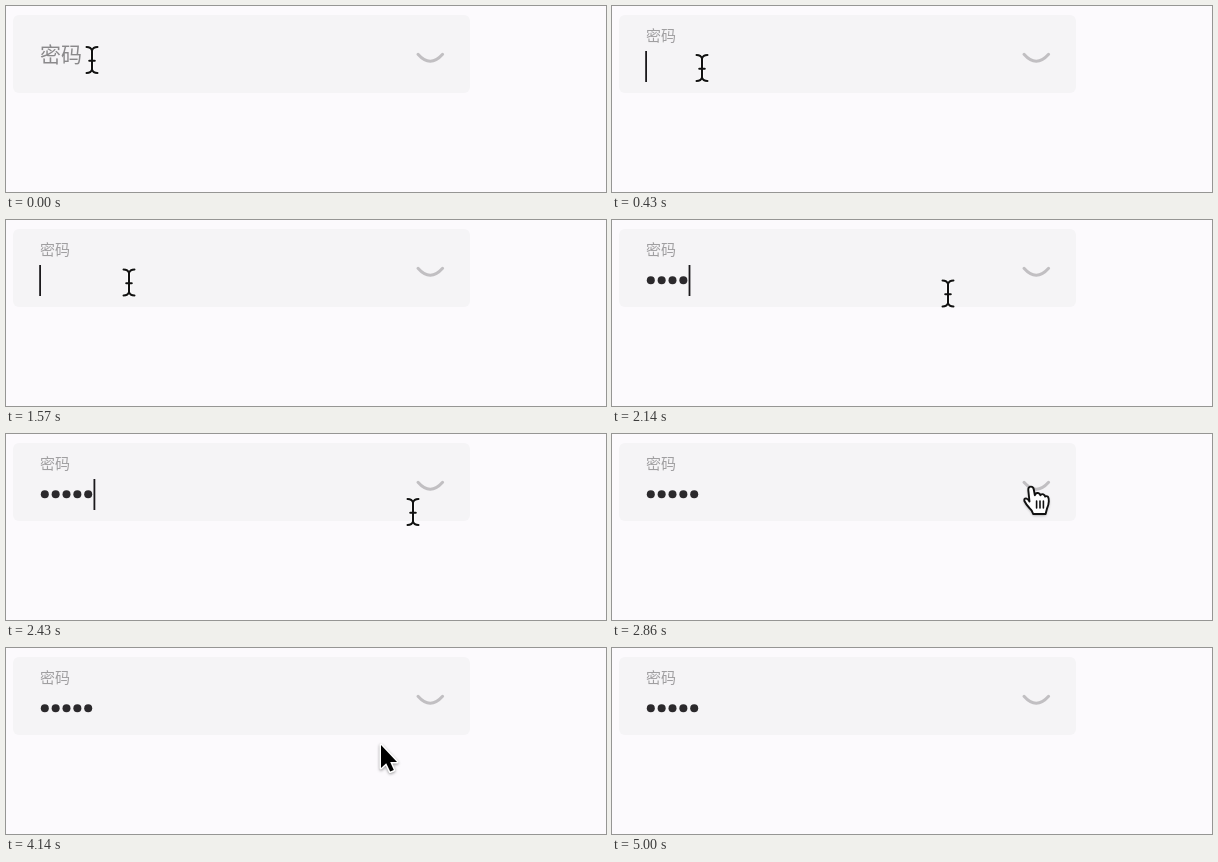
These frames come from a looping animation (600x186 px, 6010 ms). An HTML page with a canvas:

```html
<!DOCTYPE html>
<html lang="zh">
<head>
<meta charset="utf-8">
<title>密码</title>
<style>
html, body { margin: 0; width: 100%; height: 100%; overflow: hidden; background: #fcfafd; }
canvas { display: block; }
</style>
</head>
<body>
<canvas id="stage" width="600" height="186"></canvas>
<script>
const ctx = document.getElementById('stage').getContext('2d');
const LOOP = 6010;
const CJK = '"Noto Sans CJK SC", "Noto Sans CJK", sans-serif';

// [start ms, pointer kind, x, y]
const pointer = [
  [0, 'beam', 86, 54],
  [430, 'beam', 90, 62],
  [570, 'arrow', 107, 96],
  [710, 'arrow', 120, 117],
  [860, 'arrow', 124, 113],
  [1000, 'arrow', 126, 101],
  [1140, 'beam', 126, 67],
  [1290, 'beam', 123, 62.5],
  [1710, 'beam', 152, 64],
  [1860, 'beam', 209, 67],
  [2000, 'beam', 275, 70],
  [2140, 'beam', 336, 73.5],
  [2290, 'beam', 379, 81],
  [2430, 'beam', 407, 78],
  [2570, 'hand', -2, 7],
  [2710, 'hand', -1, 2],
  [2860, 'hand', 0, 0],
  [3860, 'hand', -9, 10],
  [4000, 'arrow', 375, 97],
  [4150, 'arrow', 340, 116],
  [4290, 'arrow', 326, 125.5],
  [5000, 'none', 0, 0]
];
// [start ms, label float amount]
const label = [[0, 0], [140, 0.5], [280, 1], [860, 0.4], [1000, 0], [1570, 1]];
// [start ms, dots typed]
const typed = [[0, 0], [1710, 1], [1860, 2], [2000, 3], [2140, 4], [2290, 5]];

const within = (t, a, b) => t >= a && t < b;
const mix = (a, b, k) => a + (b - a) * k;

function at(track, t) {
  let cur = track[0];
  for (const step of track) if (t >= step[0]) cur = step;
  return cur;
}

function stroke(d, color, width) {
  ctx.strokeStyle = color;
  ctx.lineWidth = width;
  ctx.stroke(d);
}

function shadow(color, blur, y) {
  ctx.shadowColor = color;
  ctx.shadowBlur = blur;
  ctx.shadowOffsetY = y;
}

const shapes = {
  beam: new Path2D('M-5.5-13Q-1-13 0-9.5Q1-13 5.5-13M0-9.5V9.5M-5.5 13Q-1 13 0 9.5Q1 13 5.5 13M-2.8 .7H2.8'),
  arrow: new Path2D('M0 0V23L5.2 18.2L9.2 26.5L12.8 25L9.2 17H16Z'),
  hand: new Path2D('M417.5 67.5L416.3 56.2Q416 52.8 418.8 52.6Q421.3 52.5 421.8 55.5L422.8 61.2' +
    'Q423.4 58.6 426 59Q428 59.3 428.4 61.4Q429.2 59.6 431.3 60.3Q433 61 433.2 62.6' +
    'Q434.5 61.6 436 62.8Q437 64 436.8 67.5Q436.6 71.5 435 74.5L433.6 80H421.2' +
    'Q420.4 76.5 417.4 74Q413.8 70 412.4 67Q411.8 64.5 414 64.4Q416 64.9 417.5 67.5Z'),
  fingers: new Path2D('M424.6 67V74M428 67V74M431.4 67V74'),
  closed: new Path2D('M412 48.3Q424.2 62.2 436.6 48.3'),
  open: new Path2D('M411.5 49Q424.5 28.5 437.5 49Q424.5 69.5 411.5 49Z')
};

function drawPointer([, kind, x, y]) {
  if (kind === 'none') return;
  ctx.save();
  ctx.translate(x, y);
  ctx.lineCap = ctx.lineJoin = 'round';
  if (kind === 'beam') {
    stroke(shapes.beam, 'rgba(255,255,255,.8)', 3.6);
    stroke(shapes.beam, '#111', 2);
  } else if (kind === 'arrow') {
    shadow('rgba(0,0,0,.4)', 3, 1.2);
    stroke(shapes.arrow, '#fff', 3);
    shadow('transparent', 0, 0);
    ctx.fillStyle = '#000';
    ctx.fill(shapes.arrow);
  } else {
    shadow('rgba(0,0,0,.4)', 3, 1.2);
    ctx.fillStyle = '#fff';
    ctx.fill(shapes.hand);
    shadow('transparent', 0, 0);
    stroke(shapes.hand, '#111', 1.9);
    stroke(shapes.fingers, '#111', 1.6);
  }
  ctx.restore();
}

function drawLabel(k) {
  const c = Math.round(mix(138, 160, k));
  ctx.fillStyle = `rgb(${c},${c - 1},${c + 1})`;
  ctx.font = `${mix(21, 15, k)}px ${CJK}`;
  ctx.fillText('密码', 34, mix(56, 35.2, k));
}

function drawEye(shown) {
  ctx.lineCap = 'round';
  if (!shown) return stroke(shapes.closed, '#c1bfc2', 3);
  stroke(shapes.open, '#c1bfc2', 2.8);
  ctx.beginPath();
  ctx.arc(424.5, 49, 4, 0, Math.PI * 2);
  ctx.stroke();
}

function drawValue(count, shown) {
  ctx.fillStyle = '#2b292c';
  if (shown) {
    ctx.font = '21px Inter, sans-serif';
    ctx.fillText('12345', 34, 68);
    return;
  }
  for (let i = 0; i < count; i++) {
    ctx.beginPath();
    ctx.arc(38.8 + i * 10.85, 60.3, 4, 0, Math.PI * 2);
    ctx.fill();
  }
}

function draw(t) {
  const shown = within(t, 3000, 3570);
  const count = at(typed, t)[1];
  ctx.fillStyle = '#fcfafd';
  ctx.fillRect(0, 0, 600, 186);
  ctx.fillStyle = '#f5f4f6';
  ctx.beginPath();
  ctx.roundRect(7, 9, 457, 78, 6);
  ctx.fill();
  drawLabel(at(label, t)[1]);
  drawValue(count, shown);
  drawEye(shown);
  if (within(t, 140, 860) || within(t, 1570, 2570)) {
    ctx.fillStyle = '#1b191c';
    ctx.fillRect(count ? 33 + count * 10.9 : 33.2, 45, 1.8, 31);
  }
  drawPointer(at(pointer, t));
}

const start = performance.now();
function tick() {
  draw((performance.now() - start) % LOOP);
  requestAnimationFrame(tick);
}
tick();
</script>
</body>
</html>
```
